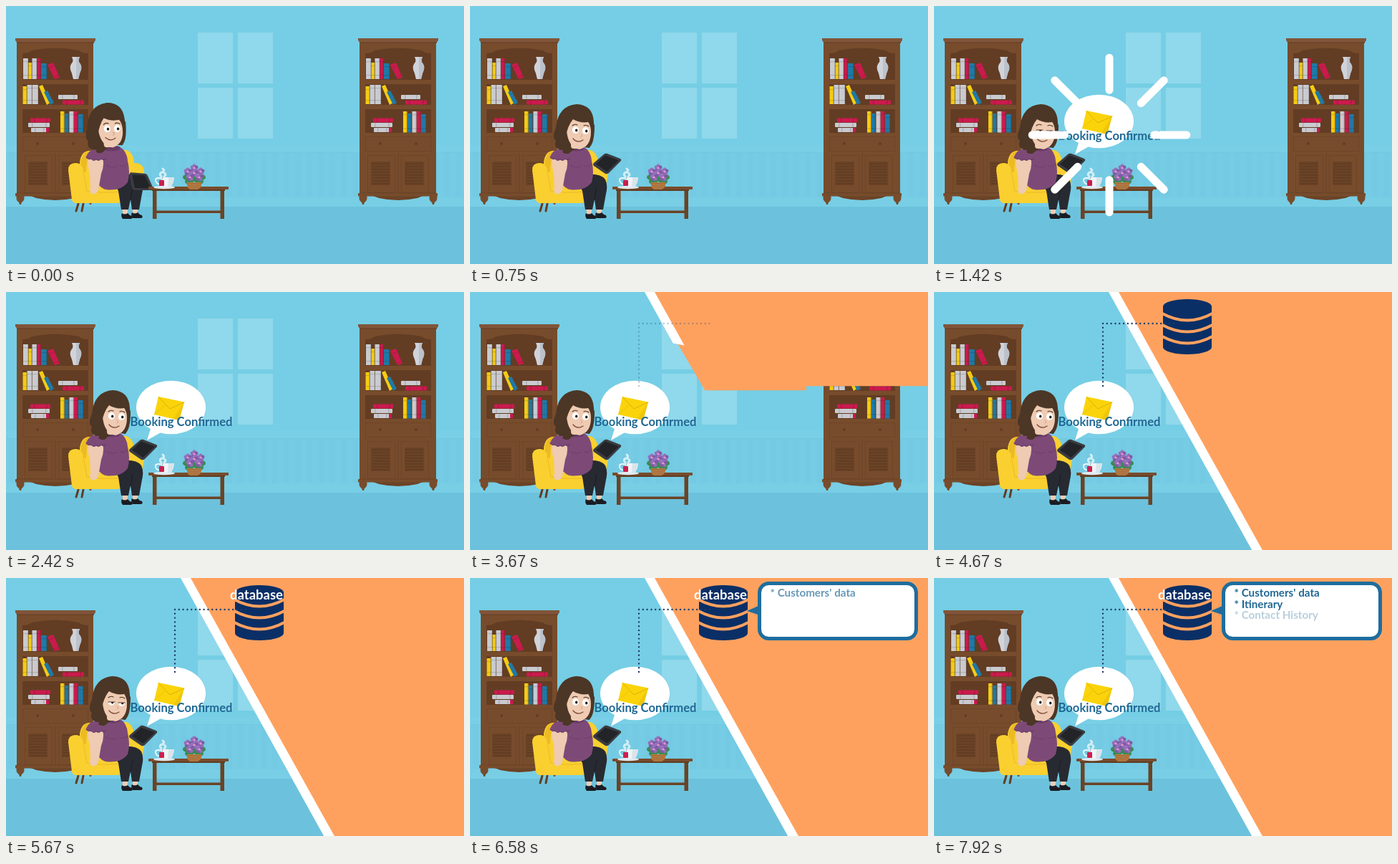
These frames come from a looping animation (640 by 360 pixels, 8 s). An HTML page:

```html
<!DOCTYPE html>
<html lang="en">
<head>
<meta charset="utf-8">
<title>Booking confirmed</title>
<style>
  html, body { margin: 0; width: 100%; height: 100%; overflow: hidden; background: #74cee6; }
  svg { display: block; width: 100vw; height: 100vh; }
  text { font-family: Lato, "Open Sans", sans-serif; font-weight: 700; }
</style>
</head>
<body>
<svg id="stage" viewBox="0 0 640 360"></svg>
<script>
const LOOP = 8000;
const C = {
  wood: '#774c2c', dark: '#623d23', edge: '#6b4326', grey: '#c9cbd0', yellow: '#f4cc14', red: '#cb1a4e',
  blue: '#2178a4', skin: '#eecbb2', hair: '#4c3626', plum: '#7d4a78', plumDark: '#693b66', pants: '#282a31',
  ink: '#1f6894', navy: '#0a2f66', orange: '#fea15f', sofa: '#f9d02f', sofaDark: '#ecba24'
};

const rect = (x, y, w, h, fill, r = 0) => `<rect x="${x}" y="${y}" width="${w}" height="${h}" rx="${r}" fill="${fill}"/>`;
const oval = (x, y, rx, ry, fill) => `<ellipse cx="${x}" cy="${y}" rx="${rx}" ry="${ry}" fill="${fill}"/>`;
const path = (d, fill) => `<path d="${d}" fill="${fill}"/>`;
const line = (d, color, w, extra = '') =>
  `<path d="${d}" fill="none" stroke="${color}" stroke-width="${w}" stroke-linecap="round" stroke-linejoin="round" ${extra}/>`;
const group = (id, inner) => `<g id="${id}">${inner}</g>`;
const repeat = (n, fn) => Array.from({ length: n }, (_, i) => fn(i)).join('');
const label = (id, x, y, size, fill, str, anchor = 'start') =>
  `<text id="${id}" x="${x}" y="${y}" font-size="${size}" fill="${fill}" text-anchor="${anchor}">${str}</text>`;

// A standing book with two bands on its spine
const book = (x, top, base, w, color) =>
  rect(x, top, w, base - top, color) +
  rect(x, top + 4, w, 1.2, '#0002') + rect(x, base - 6, w, 1.2, '#0002') +
  rect(x + w - 1, top, 1, base - top, '#0002');
const flatBook = (x, y, w, color) =>
  rect(x, y, w, 6, color, 1) + rect(x + 5, y, 1.5, 6, '#0002') + rect(x + w - 6, y, 1.5, 6, '#0002');

function room() {
  return rect(0, 0, 640, 360, '#75cee5') +
    [268, 324].map(x => [37, 114].map(y => rect(x, y, 49, 71, '#90d8eb')).join('')).join('') +
    rect(0, 194, 640, 73, '#75cce4') +
    repeat(40, i => rect(i * 16 + 4, 205, 8, 62, '#73cae2')) +
    rect(0, 194, 640, 11, '#79cfe6') + rect(0, 204, 640, 1, '#70c8e0') +
    rect(0, 267, 640, 13, '#78cee5') + rect(0, 280, 640, 80, '#6cc2dc');
}

function bookcase(dx) {
  const { grey, yellow, red, blue, wood, dark, edge } = C;
  const door = x => rect(x, 208, 39, 53, edge, 1) + rect(x + .7, 208.7, 37.6, 51.6, wood, 1) +
    rect(x + 5, 217, 27, 33, edge) + repeat(8, i => rect(x + 6, 219 + i * 4, 25, 1.8, dark));
  const foot = x => path(`M${x - 5} 264H${x + 5}Q${x + 7} 271 ${x + 2} 274L${x + 1} 277H${x - 1}L${x - 2} 274Q${x - 7} 271 ${x - 5} 264Z`, wood);
  return `<g transform="translate(${dx})">` +
    foot(20) + foot(118) + path('M22 263H116Q104 264 96 268Q69 274 42 268Q34 264 22 263Z', edge) +
    rect(15, 50, 107, 214, wood) + path('M13 45H125V48L122 52H16L13 48Z', '#80553a') + rect(15, 50.5, 108, 1.5, edge) +
    path('M23 103V66Q32 66 36 62Q69 55 102 62Q106 66 115 66V103Z', dark) +
    rect(23, 109, 92, 29, dark) + rect(23, 144, 92, 33, dark) +
    book(24, 73, 102, 7, grey) + book(31.5, 79, 102, 4.5, yellow) + book(36.5, 73, 102, 6.5, grey) +
    book(43.5, 73, 102, 5, red) + book(49, 80, 102, 8, blue) +
    path('M58 82L66 79L75 100L68 102Z', red) + line('M61 86L66 84M68 99L73 97', '#0002', 1.2) +
    path('M92 71H103L101.5 75Q101 78 104 81Q107 86 103 94L101 102H94L92 94Q88 86 91 81Q94 78 93.5 75Z', '#d0d3da') +
    path('M98 71H103L101.5 75Q101 78 104 81Q107 86 103 94L101 102H98Z', '#bcc1ca') +
    book(23.5, 112, 137, 5.5, yellow) + book(29.5, 110, 137, 7, grey) + book(37, 110, 137, 8, grey) +
    path('M46 112L51 110L62 135L57 138Z', yellow) + path('M53 120L58 118L67 135L62 138Z', blue) +
    flatBook(73, 124, 27, grey) + flatBook(79, 131.5, 30, red) +
    flatBook(34, 156.5, 28, red) + flatBook(31, 163, 30, grey) + flatBook(35, 170, 23, grey) +
    rect(56, 170, 4, 6, red) +
    book(76, 147, 176.5, 5.5, yellow) + book(82, 150, 176.5, 5.5, blue) + book(88.5, 147, 176.5, 6, grey) +
    book(95, 147, 176.5, 5.5, red) + book(101, 151, 176.5, 7, blue) +
    rect(23, 182, 92, 21, edge, 1) + rect(23.7, 182.7, 90.6, 19.6, wood, 1) +
    oval(44, 192, 2, 2, dark) + oval(94, 192, 2, 2, dark) +
    door(26) + door(73) + rect(68.5, 206, 1, 57, edge) +
    rect(13, 261, 111, 4.5, wood, 1) + rect(15, 260.5, 107, 1, edge) + '</g>';
}

function sofa() {
  return line('M101 276L98 286M108 276L106 286', C.dark, 3) +
    path('M103 230Q101 204 115 202L168 201Q178 204 179 219Q194 219 193 234L188 262H106Z', C.sofa) +
    path('M104 230Q103 207 115 202L120 203Q112 210 112 232Z', C.sofaDark) +
    path('M87 229Q87 219 97 219Q106 219 108 228L113 257Q135 261 162 258V271Q161 275 155 275H98Q93 275 92 270Z', C.sofa) +
    line('M108 229L113 258Q135 262 160 259', C.sofaDark, 1);
}

function woman() {
  const eye = (x, y) => oval(x, y, 4.5, 5, '#fff') + oval(x + 1.2, y + .6, 1.7, 2, '#231815');
  const shoe = (x, y) => rect(x + 1, y - 7, 7, 8, C.skin) +
    path(`M${x} ${y}Q${x + 4} ${y + 3} ${x + 8} ${y}Q${x + 10} ${y + 3} ${x + 14} ${y + 4}Q${x + 16} ${y + 8} ${x + 12} ${y + 8}H${x + 1}Q${x - 2} ${y + 4} ${x} ${y}Z`, '#1b1c22');
  const legs = shoe(162, 289) + shoe(176, 288) +
    path('M146 238Q180 230 189 242Q193 250 190 262L186 284H176L174 270L171 284H161L157 258Z', C.pants) +
    line('M174 270L177 254', '#1b1c22', 1);
  const tablet =
    path('M187 207Q189 205 192 206L210 213Q212 214 211 216L194 233Q192 235 189 234L173 223Q171 221 173 219Z', '#3a3c41') +
    path('M189 208.5L208 215.5L191.5 231L176 220.5Z', '#222428');
  const body =
    path('M136 196Q148 193 158 196Q169 202 170 216Q174 232 170 246Q160 259 139 256Q126 252 124 233Q113 222 117 206Q124 198 136 196Z', C.plum) +
    path('M136 197Q147 191 160 197L158 201Q147 204 136 201Z', C.plumDark) +
    line('M140 222Q148 228 156 223M160 223Q166 225 169 220', C.plumDark, .8);
  const arm =
    path('M115 211Q125 207 135 211Q138 222 133 234L129 257Q126 264 120 262Q116 260 118 252L117 233Q113 222 115 211Z', C.skin) +
    path('M118 202Q128 196 137 204L139 213Q136 216 133 213Q130 217 126 214Q122 217 119 213Q115 215 112 211Q113 206 118 202Z', C.plum) +
    line('M112 211Q115 215 119 213Q122 217 126 214Q130 217 133 213Q136 216 139 213', C.plumDark, 1.2);
  const head =
    path('M120 170Q123 139 149 137Q172 138 173 162Q175 184 167 198L152 196L141 203Q137 209 129 204Q132 200 127 201Q116 198 120 188Q114 184 120 170Z', C.hair) +
    rect(141, 190, 14, 9, C.skin, 4) +
    path('M135 174Q137 155 152 156Q169 157 169 176Q169 196 153 200Q137 197 135 174Z', C.skin) +
    path('M133 184Q137 166 144 158Q156 165 170 161L173 170Q171 148 150 145Q130 150 128 180Z', C.hair) +
    path('M168 160Q173 178 165 198Q174 195 174 166Z', C.hair) +
    eye(147.5, 173) + eye(161.5, 174) +
    `<g id="lids">${rect(142, 167.5, 11, 5.5, C.skin)}${rect(156.5, 168.5, 10, 5.5, C.skin)}${line('M143 173H152M157 174H166', C.hair, 1)}</g>` +
    line('M143 167Q146 164 150 166M159 167Q162 165 166 168', C.hair, 1.1) +
    line('M155 179Q159 181 155 183', '#cfa086', 1) +
    line('M144 185Q150 192 158 187', '#7d443a', 1.2);
  return legs + group('tablet', tablet) + body + arm + group('head', head);
}

function table() {
  const flower = (x, y) => repeat(5, i => {
    const a = i * 1.2566 - 1.57;
    return oval(x + 3 * Math.cos(a), y + 3 * Math.sin(a), 2.5, 2.5, i % 2 ? '#8059a8' : '#9470ba');
  }) + oval(x, y, 1.6, 1.6, '#e79acb');
  const leaf = (x, y) => oval(x, y, 6, 4, '#3b8a52');
  return rect(205, 256, 5.5, 41, C.edge) + rect(299.5, 256, 5.5, 41, C.edge) +
    rect(210, 285.5, 90, 3.5, C.edge) + rect(204, 255, 102, 3, C.dark) +
    rect(199, 252, 112, 4, C.wood, 1) +
    oval(221, 253, 15, 2.2, '#dfeaf0') +
    line('M219 241Q208 238 209 244Q211 250 219 249', '#eef6fa', 2) +
    path('M217 239H235Q234 249 230 252H221Q217 249 217 239Z', '#edf4f8') +
    path('M227 239H235Q234 249 230 252H226Z', '#d9e4ea') +
    line('M219 239L218 243', '#888', .6) + rect(214, 243, 7, 8, '#cb1f50', 1) +
    line('M217 238Q213 234 218 232Q223 230 219 227M221 238Q225 235 221 233', '#d3eef6', 3) +
    [[253, 239], [273, 239], [256, 245], [270, 245], [263, 241]].map(p => leaf(...p)).join('') +
    path('M253 246H273Q274 253 268 256H257Q252 253 253 246Z', '#b97f47') +
    line('M253 248H273M254 251H272M256 254H270', '#94602f', .9) +
    [[254, 231], [272, 231], [263, 226], [257, 239], [270, 239], [263, 233]].map(p => flower(...p)).join('');
}

function message() {
  return group('bubble',
    oval(230.5, 161, 48.5, 37.3, '#fff') + path('M203 188L197 207L218 195Z', '#fff') +
    path('M213 146L249 153.5L242 179L207 171Z', '#fbd30a') +
    path('M249 153.5L242 179L234 177Z', '#eec60c') +
    line('M213 146.5L229 163L249 154', '#d9b30e', 1) +
    line('M207 171L222 158', '#e6c00c', .8)) +
    label('booked', 245, 186.6, 16.6, C.ink, 'Booking Confirmed', 'middle');
}

function records() {
  const disc = y => `M319 ${y}Q354 ${y + 19} 389 ${y}`;
  return group('db',
    path('M320 20A34 10 0 0 1 388 20V77A34 10 0 0 1 320 77Z', C.navy) +
    line([30, 46, 62].map(disc).join(''), C.orange, 4)) +
    line('M236 131V44H335', '#1f3a6b', 2.4, 'id="dots" stroke-dasharray="0 5.8"') +
    label('dbName', 350, 30, 18.5, '#fff', 'database', 'middle') +
    group('callout', path('M405 38L387 46L405 52Z', '#1f6d9d') +
      `<rect x="404.5" y="7.5" width="219" height="77" rx="13" fill="#fff" stroke="#1f6d9d" stroke-width="5"/>`) +
    ["Customers' data", 'Itinerary', 'Contact History']
      .map((s, i) => label('item' + i, 419.5, 26 + i * 15.6, 15.2, C.ink, '* ' + s)).join('');
}

const stage = document.getElementById('stage');
stage.innerHTML = room() + bookcase(0) + bookcase(479) + sofa() + woman() + table() +
  `<polygon id="panel" fill="${C.orange}"/><polygon id="stripe" fill="#fff"/>` +
  message() + records() + line('', '#fff', 11, 'id="burst"');

const el = {};
stage.querySelectorAll('[id]').forEach(node => el[node.id] = node);

const ramp = (t, start, length) => Math.min(1, Math.max(0, (t - start) / length));
const easeOut = p => 1 - (1 - p) ** 2;
const easeInOut = p => p * p * (3 - 2 * p);
const set = (id, name, value) => el[id].setAttribute(name, value);

const fades = [
  ['booked', 1130, 250], ['dots', 3520, 500], ['db', 4260, 350], ['dbName', 5100, 450],
  ['callout', 5940, 330], ['item0', 6280, 450], ['item1', 7030, 450], ['item2', 7780, 450]
];
const blinks = [1420, 5670];

function draw(t) {
  const rest = 1 - easeInOut(ramp(t, 40, 700));
  set('tablet', 'transform', `translate(${-3 * rest} ${26 * rest}) rotate(${45 * rest} 191 219)`);
  set('head', 'transform', `translate(${-4 * rest} ${-2 * rest}) rotate(${-5 * rest} 148 198)`);
  set('lids', 'visibility', blinks.some(b => Math.abs(t - b) < 80) ? 'visible' : 'hidden');

  const pop = easeOut(ramp(t, 920, 330));
  set('bubble', 'transform', `translate(197 207) scale(${pop}) translate(-197 -207)`);

  const outer = 133 * easeOut(ramp(t, 1150, 480));
  const inner = 133 * easeOut(ramp(t, 1230, 700));
  set('burst', 'visibility', outer - inner > .3 ? 'visible' : 'hidden');
  set('burst', 'd', repeat(8, i => {
    const x = Math.cos(i * Math.PI / 4), y = Math.sin(i * Math.PI / 4);
    return `M${245 + x * inner} ${180 + y * inner}L${245 + x * outer} ${180 + y * outer}`;
  }));

  const h = 370 * ramp(t, 3374, 800), right = Math.max(0, h - 6);
  set('panel', 'points', `248,0 640,0 640,${right} 470,${right} 470,${h} ${248 + .585 * h},${h}`);
  const s = 366 * ramp(t, 3500, 840), cut = Math.max(0, s - 3);
  set('stripe', 'points', s ? `244,0 258,0 ${258 + .558 * s},${s} ${244 + .556 * cut},${cut}` : '');

  for (const [id, start, length] of fades) set(id, 'opacity', ramp(t, start, length));
}

const began = performance.now();
function tick() {
  draw((performance.now() - began) % LOOP);
  requestAnimationFrame(tick);
}
draw(0);
requestAnimationFrame(tick);
</script>
</body>
</html>
```
